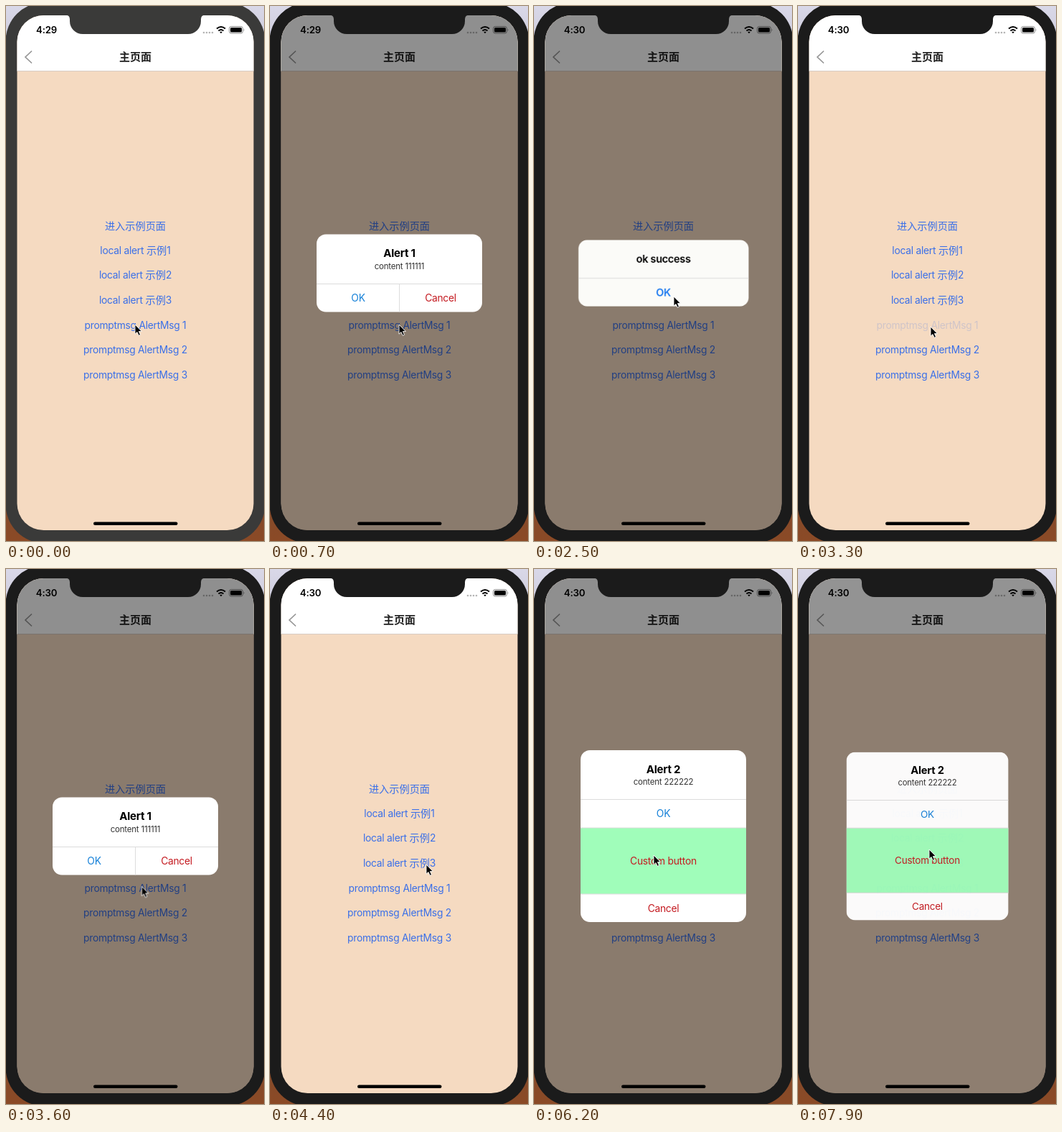
These frames come from a looping animation (360x744 px, 8 s). An HTML page:

```html
<!DOCTYPE html>
<html lang="zh">
<head>
<meta charset="utf-8">
<title>Alert demo</title>
<style>
html, body { margin: 0; width: 100%; height: 100%; overflow: hidden; }
svg { display: block; width: 360px; height: 744px; }
text {
  font: 400 13.8px Inter, "Noto Sans CJK SC", "Noto Sans CJK", sans-serif;
  letter-spacing: -.25px;
  text-anchor: middle;
}
.links text { fill: #3a6fe8; }
.links .cjk, .cjk { font-size: 14.2px; letter-spacing: 0; }
.nav { font-size: 15px; font-weight: 700; letter-spacing: 0; fill: #222; }
.clock { font-size: 13.2px; font-weight: 600; letter-spacing: -.2px; }
.title { font-size: 15px; font-weight: 700; }
.body { font-size: 11.5px; letter-spacing: -.2px; fill: #333; }
.native { font-size: 14.6px; font-weight: 600; letter-spacing: -.35px; }
.ok { fill: #1580d8; }
.red { fill: #c41a20; }
.rule { stroke: #dcdcdc; stroke-width: 1; }

.bezel, .dim, .tap1, .tap2, .alert, .early, .late, .cursor { animation: 8s linear infinite; }
.alert { transform-origin: 180.5px 371.5px; }
.bezel { animation-name: focus; }
.dim { animation-name: dim; }
.tap1 { animation-name: tap1; }
.tap2 { animation-name: tap2; }
#choice { animation-name: choice; }
#success { animation-name: success; }
#custom { animation-name: custom; }
.early { animation-name: early; }
.late { animation-name: late; }
.cursor { animation-name: pointer; animation-timing-function: ease-in-out; }

@keyframes focus {
  0%, 1.2% { fill: #3a3a39; }
  1.25%, 100% { fill: #1b1b1b; }
}
@keyframes early { 0%, 23.7% { opacity: 1; } 23.75%, 100% { opacity: 0; } }
@keyframes late { 0%, 23.7% { opacity: 0; } 23.75%, 100% { opacity: 1; } }
@keyframes tap1 {
  0%, 2.5% { opacity: 1; }
  3.5%, 5% { opacity: .2; }
  7.5%, 39.5% { opacity: 1; }
  40.5%, 42.5% { opacity: .2; }
  45%, 100% { opacity: 1; }
}
@keyframes tap2 {
  0%, 61.25% { opacity: 1; }
  62.25%, 63.5% { opacity: .2; }
  66%, 100% { opacity: 1; }
}
@keyframes dim {
  0%, 5% { opacity: 0; }
  8.75%, 16.9% { opacity: .44; }
  19% { opacity: 0; }
  20% { opacity: .21; }
  22.5%, 33.1% { opacity: .44; }
  35.6%, 42.5% { opacity: 0; }
  45%, 51.25% { opacity: .44; }
  53.75%, 63.1% { opacity: 0; }
  66.25%, 98.3% { opacity: .44; }
  98.75% { opacity: .425; }
  100% { opacity: .33; }
}
@keyframes choice {
  0%, 5% { opacity: 0; transform: scale(.8); }
  8.75%, 16.9% { opacity: 1; transform: none; }
  19%, 42.5% { opacity: 0; transform: scale(.8); }
  45%, 51.25% { opacity: 1; transform: none; }
  53.75%, 100% { opacity: 0; transform: scale(.8); }
}
@keyframes success {
  0%, 19% { opacity: 0; transform: scale(1.2); }
  20% { opacity: .5; transform: scale(1.127); }
  21.25% { opacity: .9; transform: scale(1.03); }
  23.1%, 33.1% { opacity: 1; transform: none; }
  35.6%, 100% { opacity: 0; transform: none; }
}
@keyframes custom {
  0%, 63.1% { opacity: 0; transform: scale(.8); }
  66.25%, 98.3% { opacity: 1; transform: none; }
  98.75% { opacity: .97; transform: scale(.98); }
  100% { opacity: .75; transform: scale(.92); }
}
@keyframes pointer {
  0%, 8.75% { transform: translate(180px, 443px); }
  15%, 22.5% { transform: translate(133px, 408px); }
  28.75%, 33.75% { transform: translate(195px, 404px); }
  38.75%, 43.75% { transform: translate(185px, 446px); }
  48.75%, 56.25% { transform: translate(218px, 411px); }
  61.25%, 66.25% { transform: translate(200px, 474px); }
  73.75%, 80% { transform: translate(167px, 398px); }
  86.25% { transform: translate(160px, 404px); }
  93.75%, 100% { transform: translate(183px, 390px); }
}
</style>
</head>
<body>
<svg viewBox="0 0 360 744">
  <defs>
    <linearGradient id="desk" x2="0" y2="1">
      <stop offset="0" stop-color="#d9d8e8"/>
      <stop offset=".3" stop-color="#a7a3b2"/>
      <stop offset=".85" stop-color="#7a4a30"/>
      <stop offset="1" stop-color="#8b4a26"/>
    </linearGradient>
    <clipPath id="screen"><rect x="15.5" y="13" width="330" height="716" rx="37"/></clipPath>
    <clipPath id="card"><rect x="65" y="252" width="231" height="239" rx="13"/></clipPath>
  </defs>

  <rect width="360" height="744" fill="url(#desk)"/>
  <rect class="bezel" x="-.5" y="-5" width="362" height="752" rx="54"/>

  <g clip-path="url(#screen)">
    <rect x="15" y="13" width="331" height="717" fill="#f5dac1"/>
    <rect x="15" y="13" width="331" height="77" fill="#fff"/>
    <path d="M15 90.5H346" stroke="#d8cdc4"/>
    <path d="M36 62.5 27 71l9 8.500" fill="none" stroke="#969696" stroke-width="1.7"/>
    <text class="nav" x="180.500" y="76">主页面</text>

    <g class="links">
      <text class="cjk" x="180.500" y="311">进入示例页面</text>
      <text x="180.500" y="344.500">local alert <tspan class="cjk">示例</tspan>1</text>
      <text x="180.500" y="379">local alert <tspan class="cjk">示例</tspan>2</text>
      <text x="180.500" y="413.500">local alert <tspan class="cjk">示例</tspan>3</text>
      <text class="tap1" x="180.500" y="448.500">promptmsg AlertMsg 1</text>
      <text class="tap2" x="180.500" y="483">promptmsg AlertMsg 2</text>
      <text x="180.500" y="518">promptmsg AlertMsg 3</text>
    </g>

    <g fill="#b5b5b5">
      <circle cx="276" cy="37" r="1.300"/><circle cx="280" cy="37" r="1.300"/>
      <circle cx="284" cy="37" r="1.300"/><circle cx="288" cy="37" r="1.300"/>
    </g>
    <rect class="dim" x="15" y="13" width="331" height="717"/>

    <text class="clock early" x="56.500" y="38">4:29</text>
    <text class="clock late" x="56.500" y="38">4:30</text>
    <g fill="none" stroke="#000" stroke-width="2">
      <path d="M294 31.500q6-5 12 0M296.500 34.500q3.500-3 7 0"/>
      <path d="M298.300 36.200q1.700-1.200 3.400 0L300 38.200z" fill="#000" stroke="none"/>
    </g>
    <rect x="311.500" y="28.500" width="19" height="9.500" rx="2.800" fill="none" stroke="#000" stroke-opacity=".45"/>
    <rect x="313" y="30" width="16" height="6.500" rx="1.500"/>
    <path d="M331.800 31.500q1.600 1.700 0 3.500z" opacity=".5"/>
    <rect x="122" y="717.500" width="117.500" height="4.500" rx="2.250"/>
  </g>
  <path class="bezel" d="M83 12.500q6 0 6 6v2.500a18 18 0 0 0 18 18H254a18 18 0 0 0 18-18v-2.500q0-6 6-6z"/>

  <g class="alert" id="choice">
    <rect x="65" y="317.500" width="231" height="108" rx="13" fill="#fff"/>
    <path class="rule" d="M65 386.500H296M180.500 386.500V425.500"/>
    <text class="title" x="180.500" y="349">Alert 1</text>
    <text class="body" x="180.500" y="366">content 111111</text>
    <text class="ok" x="123" y="411">OK</text>
    <text class="red" x="238" y="411">Cancel</text>
  </g>

  <g class="alert" id="success">
    <rect x="62" y="325.500" width="237.500" height="92" rx="12" fill="#fbfbf8"/>
    <path class="rule" d="M62 378.500H299.500"/>
    <text class="native" x="180.500" y="357">ok success</text>
    <text class="native" x="180.500" y="403.500" fill="#1a78f0">OK</text>
  </g>

  <g class="alert" id="custom">
    <g clip-path="url(#card)">
      <rect x="65" y="252" width="231" height="239" fill="#fff"/>
      <rect x="65" y="360" width="231" height="92" fill="#a0fdba"/>
      <path class="rule" d="M65 320.500H296M65 360H296M65 452H296"/>
    </g>
    <text class="title" x="180.500" y="283.500">Alert 2</text>
    <text class="body" x="180.500" y="300">content 222222</text>
    <text class="ok" x="180.500" y="345">OK</text>
    <text class="red" x="180.500" y="411">Custom button</text>
    <text class="red" x="180.500" y="476.500">Cancel</text>
  </g>

  <path class="cursor" d="M0 0V13.200L3 10.500 5.200 15.300 7.500 14.200 5.400 9.600H9.400Z" stroke="#fff" stroke-width=".9"/>
</svg>
</body>
</html>
```
